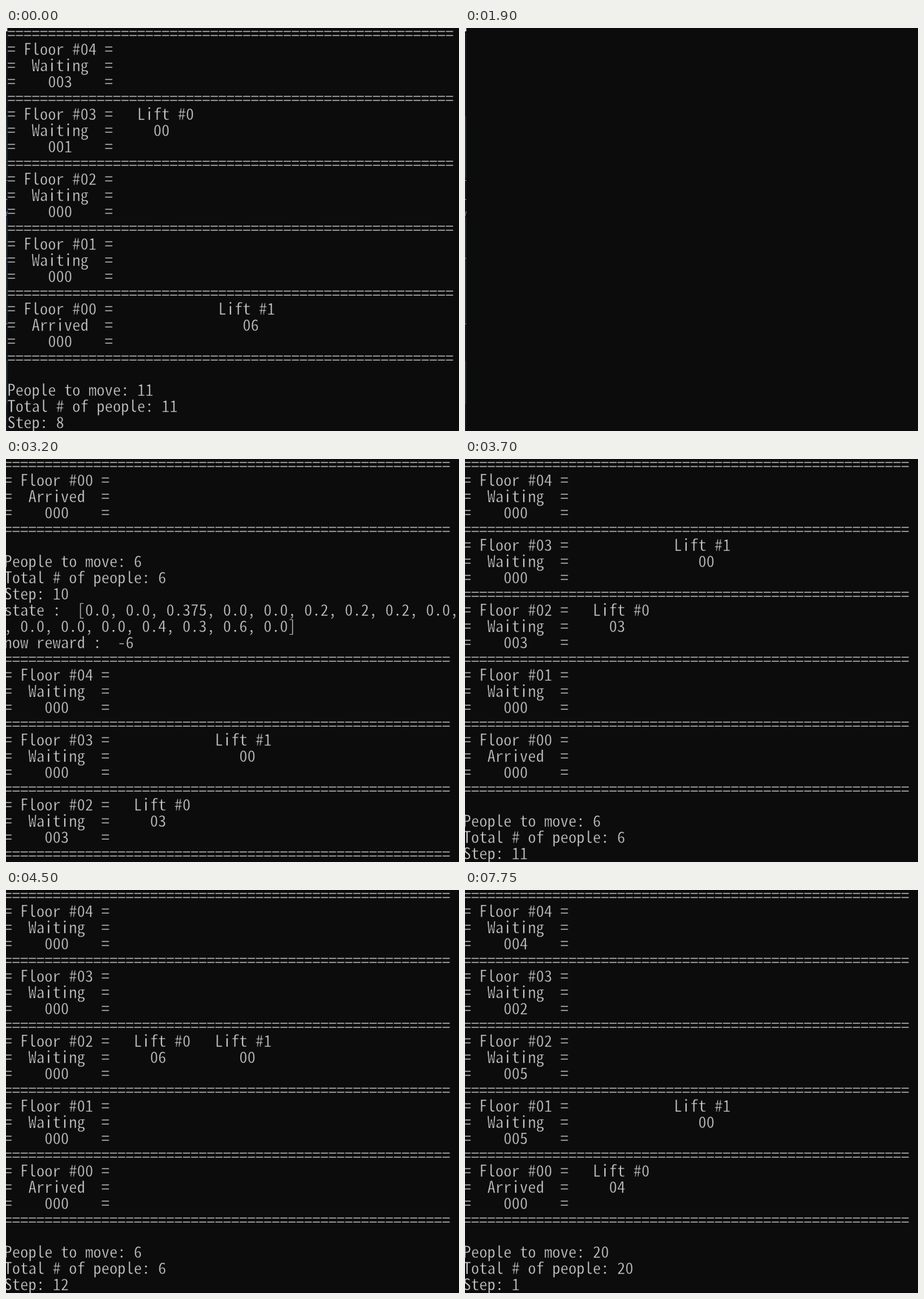
These frames come from a looping animation (670x596 px, 8000 ms). An HTML page:

```html
<!DOCTYPE html>
<html lang="en">
<head>
<meta charset="utf-8">
<title>Lift simulation</title>
<style>
  html, body { margin: 0; width: 100%; height: 100%; overflow: hidden; background: #0c0c0c; }
  svg { display: block; width: 670px; height: 596px; }
  text {
    font-family: "Noto Sans Mono CJK KR", "Noto Sans Mono CJK JP", "Noto Sans Mono CJK SC", "Noto Sans Mono", monospace;
    font-size: 24px;
    letter-spacing: calc(12px - 1ch);
    white-space: pre;
    fill: #ccc;
    stroke: #0c0c0c;
    stroke-width: .4px;
  }
</style>
</head>
<body>
<svg viewBox="0 0 670 596">
  <g id="term"></g>
  <g id="edge">
    <path d="M1 6V596" stroke="#262b36"/>
    <path d="M1 130V222M1 280V436M1 492V556" stroke="#34465a"/>
    <path d="M0 225.5h2M0 253.5h2M0 340.5h2M0 437.5h2" stroke="#8290a0"/>
    <path d="M0 278L2 271" stroke="#7d8fe0"/>
    <path d="M0 0h2v5h-2z" fill="#ddd"/>
  </g>
</svg>
<script>
const LOOP = 8000, LEAD = 20; // LEAD makes up for the delay until a frame is shown
const ROWS = 25, CUT = 1950, FIRST_STEP = 2100, STEP = 800, RESTART = 7750;
const RULE = "=".repeat(55);
const pad = (n, len) => String(n).padStart(len, "0");

// waits: one digit per floor, top floor first; lifts: [floor, riders]
function building(step, waits, lifts, moving, total = moving) {
  const out = [RULE];
  [...waits].forEach((count, i) => {
    const floor = 4 - i;
    let name = `= Floor #${pad(floor, 2)} =`;
    let label = `=  ${floor ? "Waiting" : "Arrived"}  =`;
    lifts.forEach(([at, riders], n) => {
      if (at !== floor) return;
      name = name.padEnd(n ? 26 : 16) + "Lift #" + n;
      label = label.padEnd(n ? 29 : 18) + pad(riders, 2);
    });
    out.push(name, label, `=    ${pad(count, 3)}    =`, RULE);
  });
  return [...out, "", "People to move: " + moving, "Total # of people: " + total, "Step: " + step];
}

const REPORT = [
  "state :  [0.0, 0.0, 0.375, 0.0, 0.0, 0.2, 0.2, 0.2, 0.0,",
  ", 0.0, 0.0, 0.0, 0.4, 0.3, 0.6, 0.0]",
  "now reward :  -6"
];

// Steps 8 to 15: lift 0 picks up floor 2 and drops everyone at floor 0
function ride(step) {
  const [a, b] = ["33222100", "22332321"].map(route => +route[step - 8]);
  const loaded = step >= 12, done = step === 15;
  const waits = done ? "00006" : loaded ? "00000" : "00300";
  const riders = done ? 0 : loaded ? 6 : 3;
  return building(step, waits, [[a, riders], [b, 0]], done ? 0 : 6, 6);
}

function screen(t) {
  if (t < 950) return building(8, "31000", [[3, 0], [0, 6]], 11);
  if (t < 1000 || t >= 1900 && t < CUT) return [];
  if (t < 1900) return building(9, "31006", [[3, 0], [0, 0]], 5, 11);
  if (t >= RESTART) return building(1, "42550", [[0, 4], [1, 0]], 20);

  const step = Math.min(15, 9 + Math.floor((t - FIRST_STEP) / STEP));
  const view = ride(step);
  const age = (t - FIRST_STEP) % STEP;
  // the same picture printed again, caught while the console scrolls
  if ((step === 10 || step === 11) && age >= 300 && age < 350) {
    const top = 56 - 4 * step;
    return [...view, ...REPORT, ...view].slice(top, top + ROWS);
  }
  return view;
}

const term = document.getElementById("term");
const edge = document.getElementById("edge");
const lines = Array.from({ length: ROWS }, (_, row) => {
  const line = document.createElementNS("http://www.w3.org/2000/svg", "text");
  line.setAttribute("y", 16 + row * 24);
  return term.appendChild(line);
});

let shown;
function draw(t) {
  const text = screen(t), key = text.join("\n") + (t < CUT);
  if (key === shown) return;
  shown = key;
  edge.style.visibility = t < CUT ? "visible" : "hidden";
  term.setAttribute("transform", `translate(${t < CUT ? 2 : -3})`);
  lines.forEach((line, row) => {
    line.textContent = text[row] || "";
    line.setAttribute("dy", text[row] === RULE ? 1 : 0);
  });
}

function tick(now) {
  draw((now + LEAD) % LOOP);
  requestAnimationFrame(tick);
}
tick(0);
</script>
</body>
</html>
```
